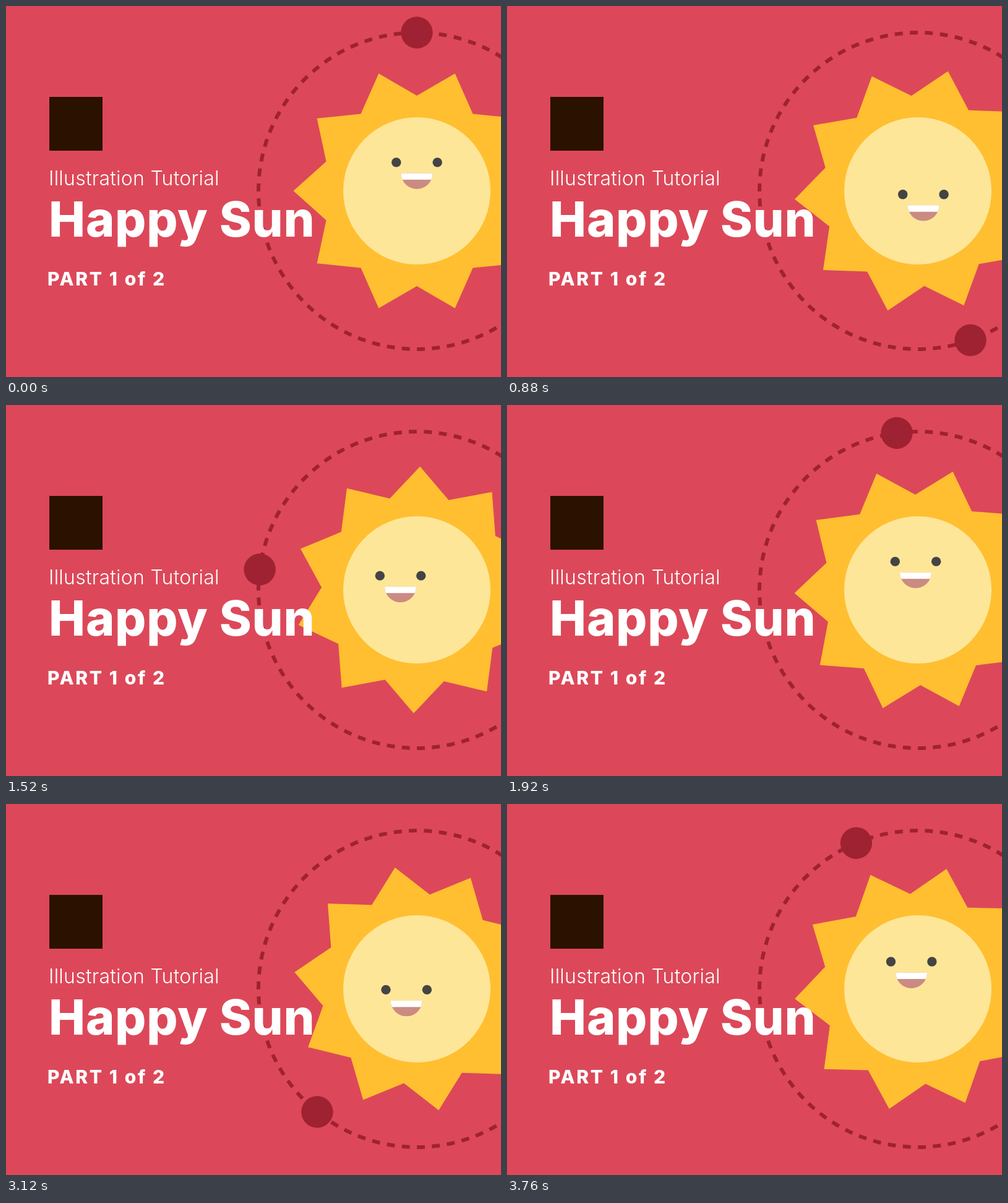
An HTML page that plays this animation: 800x600 px, repeating every 3840 ms.

```html
<!DOCTYPE html>
<html lang="en">
<head>
<meta charset="utf-8">
<title>Happy Sun</title>
<style>
  html, body { margin: 0; width: 100%; height: 100%; overflow: hidden; background: #dc4859; }
  svg { display: block; width: 800px; height: 600px; }
  text { fill: #fff; font-family: Inter, sans-serif; font-weight: 800; }
  .kicker { font-size: 32px; font-weight: 300; letter-spacing: .25px; }
  .title { font-size: 79px; letter-spacing: .75px; }
  .part { font-size: 30px; letter-spacing: 2.6px; }
</style>
</head>
<body>
<svg viewBox="0 0 800 600">
  <g transform="translate(664 299)">
    <!-- 66 dashes, the first one ending at the top -->
    <circle r="256" fill="none" stroke="#9f2232" stroke-width="6" pathLength="660"
      stroke-dasharray="5.3 4.7" transform="rotate(-92.9)"/>
    <circle id="planet" cy="-256" r="25.7" fill="#9f2232"/>
    <polygon id="rays" fill="#ffbf30"/>
    <circle r="119" fill="#fee699"/>
    <g id="face">
      <g fill="#444"><circle cx="-33.2" r="7.7"/><circle cx="33.2" r="7.7"/></g>
      <clipPath id="smile"><path d="M-25.5 17.5h51a25.5 25.5 0 0 1-51 0z"/></clipPath>
      <g clip-path="url(#smile)">
        <rect x="-26" y="17" width="52" height="27" fill="#cb8b82"/>
        <rect x="-26" y="17" width="52" height="11" fill="#fff"/>
      </g>
    </g>
  </g>
  <rect x="70" y="147" width="86" height="87" fill="#2b1100"/>
  <text class="kicker" x="69" y="290">Illustration Tutorial</text>
  <text class="title" x="69" y="373">Happy Sun</text>
  <text class="part" x="67" y="452">PART 1 of 2</text>
</svg>
<script>
const STEP = 80, STEPS = 48, TURN = 24;
const FACE_ORBIT = 26.7, FACE_Y = -19.4;
const [planet, rays, face] = ['planet', 'rays', 'face'].map(id => document.getElementById(id));

// Angles run clockwise from the top.
const polar = (radius, degrees) => {
  const a = degrees * Math.PI / 180;
  return [radius * Math.sin(a), -radius * Math.cos(a)];
};

rays.setAttribute('points',
  Array.from({ length: 20 }, (_, i) => polar(i % 2 ? 199.5 : 154, i * 18)).join(' '));

// The second turn repeats the first without its opening pose.
function orbitAngle(step) {
  const k = step > TURN ? step - TURN : step;
  return 14.6 * k + 0.65 * Math.max(0, k - 21);
}

function draw(now) {
  const angle = orbitAngle(Math.floor(now / STEP) % STEPS);
  const [x, y] = polar(FACE_ORBIT, angle);
  planet.setAttribute('transform', `rotate(${angle})`);
  rays.setAttribute('transform', `rotate(${angle / 5})`);
  face.setAttribute('transform', `translate(${x} ${y + FACE_Y})`);
}

function tick() {
  draw(performance.now());
  requestAnimationFrame(tick);
}
tick();
</script>
</body>
</html>
```
